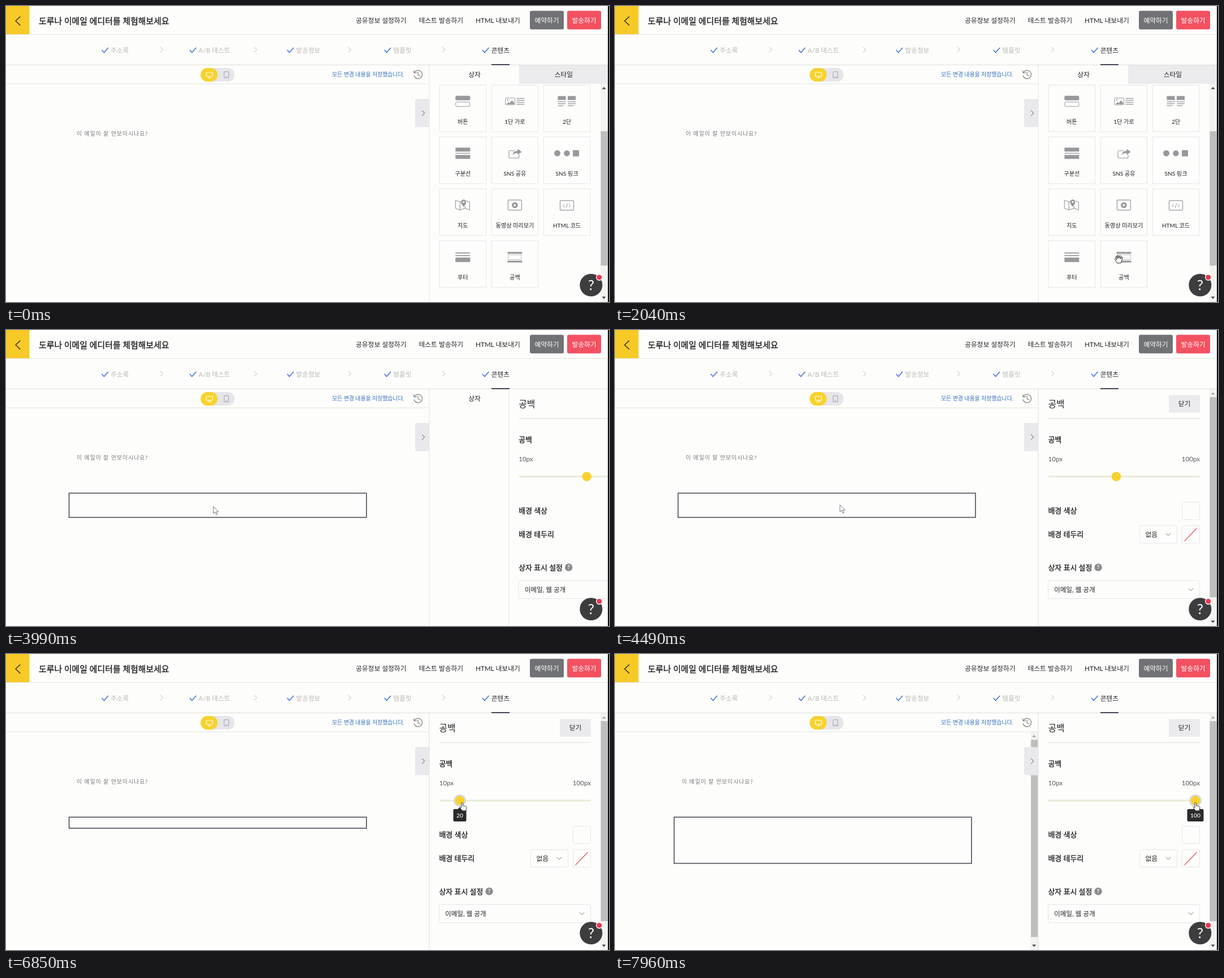
Recreate the animation shown at these times as an HTML page. Size 1067 by 525 pixels, loop 7.99 s.

```html
<!DOCTYPE html>
<html lang="ko">
<head>
<meta charset="utf-8">
<style>
html, body { margin: 0; width: 100%; height: 100%; overflow: hidden; background: #fdfdfb; }
svg { display: block; width: 1067px; height: 525px; }
text { font-family: Lato, "Noto Sans CJK KR", "Noto Sans CJK", sans-serif; white-space: pre; }
.line { fill: none; stroke-linecap: round; stroke-linejoin: round; }
.medium { stroke: #222226; stroke-width: .35; }
</style>
</head>
<body>
<svg id="stage" viewBox="0 0 1067 525"></svg>
<script>
const LOOP = 7990;
const INK = '#222226', GREY = '#98989d', PALE = '#b9b9b6', RULE = '#e4e4dd', EDGE = '#e6e6ed', YELLOW = '#f8d22c';

// Shape helpers; text is placed by its vertical centre
const text = (x, cy, size, str, fill = INK, more = '') =>
  `<text x="${x}" y="${cy + size * .36}" font-size="${size}" fill="${fill}" ${more}>${str}</text>`;
const mid = (x, cy, size, str, fill, more = '') => text(x, cy, size, str, fill, `text-anchor="middle" ${more}`);
const rect = (x, y, w, h, fill, more = '') =>
  `<rect x="${x}" y="${y}" width="${w}" height="${h}" fill="${fill}" ${more}/>`;
const frame = (x, y, w, h, stroke = EDGE, r = 0, width = 1) =>
  rect(x, y, w, h, 'none', `rx="${r}" stroke="${stroke}" stroke-width="${width}"`);
const disc = (x, y, r, fill, more = '') => `<circle cx="${x}" cy="${y}" r="${r}" fill="${fill}" ${more}/>`;
const path = (d, stroke, width = 1) => `<path class="line" d="${d}" stroke="${stroke}" stroke-width="${width}"/>`;
const shape = (d, fill) => `<path d="${d}" fill="${fill}"/>`;
const group = (id, body, more = '') => `<g id="${id}" ${more}>${body}</g>`;
const at = (x, y, body) => `<g transform="translate(${x} ${y})">${body}</g>`;
const rows = (x, w, ys, h = 1.3) => ys.map(y => rect(x, y, w, h, GREY)).join('');
const MEDIUM = 'class="medium"';

function scrollbar(x, top, thumbY, thumbH, upFill, id = '') {
  const c = x + 6;
  return rect(x, top, 13, 525 - top, '#f3f3f2') +
    rect(x + .5, thumbY, 12, thumbH, '#bebebe', id) +
    shape(`M${c - 3.5} ${top + 9.5}h7l-3.5 -4z`, upFill) + shape(`M${c - 3.5} 515.5h7l-3.5 4z`, '#444');
}

function header() {
  const steps = [[169, '주소록'], [324.5, 'A/B 테스트'], [497, '발송정보'], [669, '템플릿'], [842.5, '콘텐츠']];
  return rect(0, 0, 1067, 105, '#fdfdfb') + rect(0, 0, 41.6, 50, '#f7ca27') +
    path('M25 19l-8 7.5 8 7.5', INK, 1.3) +
    text(58, 26.5, 14.9, '도루나 이메일 에디터를 체험해보세요', INK, MEDIUM) +
    text(619, 25.5, 11.75, '공유정보 설정하기') + text(730.5, 25.5, 11.75, '테스트 발송하기') +
    text(831, 25.5, 11.75, 'HTML 내보내기') +
    rect(927, 8.5, 60, 33, '#717276', 'rx="3"') + mid(957, 25.5, 11.75, '예약하기', '#fff') +
    rect(993, 8.5, 60, 33, '#f35162', 'rx="3"') + mid(1023, 25.5, 11.75, '발송하기', '#fff') +
    rect(0, 50, 1066, 1, RULE) + rect(0, 104, 1066, 1, '#deded8') +
    steps.map(([x, s], i) => path(`M${x + 1} 78.5l3.5 4 7 -8`, '#4a78e0', 1.7) +
      text(x + 16.3, 78.5, 11.6, s, i == 4 ? INK : PALE)).join('') +
    [0, 1, 2, 3].map(i => path(`M${273 + i * 166.4} 73l4.5 4.5 -4.5 4.5`, PALE)).join('') +
    rect(859, 103, 32, 2, '#444452');
}

function toolbar() {
  return rect(0, 105, 749, 33, '#fdfdfb') + rect(0, 137.5, 749, 1, RULE) +
    rect(344.5, 110, 60, 24, '#e6e6ea', 'rx="12"') + rect(344.5, 110, 30, 24, YELLOW, 'rx="12"') +
    frame(354.5, 117.5, 11, 7.5, '#fff', 1, 1.2) + path('M360 125v2.5M357.5 127.5h5', '#fff', 1.2) +
    frame(386, 116.5, 8, 11, '#a5a5aa', 1, 1.1) + path('M389 125.5h2', '#a5a5aa') +
    text(577, 121.5, 9.87, '모든 변경 내용을 저장했습니다.', '#3671c4') +
    path('M722.5 118.5a7.3 7.3 0 1 1 -.4 5M721.5 114.5l.8 4.5 4.4 -.6M729 117v5l3.5 2', '#85858a', 1.2);
}

const icons = [
  ['버튼', rect(-13, -10, 26, 8, GREY, 'rx="2"') + frame(-12.5, 1, 25, 8, GREY, 2)],
  ['1단 가로', frame(-16.5, -6, 16.5, 12, GREY, 1) + disc(-12.5, -2.5, 1.3, GREY) +
    shape('M-15 5l4 -4 2 2 4 -5 4 5v2z', GREY) + rows(3, 14, [-6, -2.5, 1, 4.5])],
  ['2단', [-16, 1.5].map(x => rect(x, -9.5, 14, 7, GREY) + rows(x, 14, [0, 3.5]) + rows(x, 10, [7])).join('')],
  ['구분선', rect(-13, -10, 26, 7, GREY) + rows(-13, 26, [-.6]) + rect(-13, 3, 26, 7, GREY)],
  ['SNS 공유', path('M0 -4.5h-9q-1.5 0 -1.5 1.5v10q0 1.5 1.5 1.5h15q1.5 0 1.5 -1.5v-4', GREY, 1.1) +
    shape('M-4 3q1 -7 9 -7.5v-3.5l7 5.5 -7 5.5v-3.5q-6 0 -9 3.5z', GREY)],
  ['SNS 링크', disc(-17, 0, 5.5, GREY) + disc(0, 0, 5.2, GREY) + rect(10.5, -5.5, 11, 11, GREY)],
  ['지도', path('M-5 -6l-8 -2.5v14l8 3 9 -3 8 3v-14l-5 -2M-5 -6l3 -1M-5 -6v14.5M4 2v3.5', GREY, 1.1) +
    shape('M1.5 3q-4.5 -5.5 -4.5 -8.5a4.5 4.5 0 0 1 9 0q0 3 -4.5 8.5z', GREY) +
    disc(1.5, -5.5, 1.6, '#fdfdfb')],
  ['동영상 미리보기', frame(-12, -9, 24, 18, GREY, 1.5, 1.2) + disc(0, 0, 5.3, GREY) +
    shape('M-1.5 -2.8v5.6l4.3 -2.8z', '#fff')],
  ['HTML 코드', frame(-12, -8, 24, 17, GREY, 1.5, 1.2) +
    path('M-4 -1.5l-2.5 2.5 2.5 2.5M4 -1.5l2.5 2.5 -2.5 2.5M1.2 -2.5l-2.4 7', GREY)],
  ['푸터', rows(-13, 26, [-8, -3.5], 1.8) + rect(-13, 1, 26, 8, GREY)],
  ['공백', rect(-13, -9, 26, 3.2, GREY) + rect(-13, 6.5, 26, 3.2, GREY) +
    rect(-11.5, -4, 23, 8.5, 'none', `stroke="${GREY}" stroke-dasharray="2 1.3"`)]
];

function palette() {
  return icons.map(([name, icon], i) => {
    const x = 767 + i % 3 * 92.1, y = 140.3 + Math.floor(i / 3) * 92;
    return frame(x, y, 82.5, 82.7) + at(x + 41.3, y + 28.9, icon) + mid(x + 41.3, y + 65, 10.15, name);
  }).join('') + scrollbar(1052, 138, 222, 238.5, '#444');
}

function settings() {
  const label = (y, s) => text(766.5, y, 12.9, s, INK, MEDIUM);
  const chevron = (x, y) => path(`M${x - 4} ${y - 2}l4 4 4 -4`, '#77777c');
  return rect(749, 105, 320, 420, '#fdfdfb') + rect(748.5, 105, 1, 420, RULE) +
    text(766.5, 131, 15.8, '공백') + rect(980, 115.5, 55, 31, '#ebebee') + mid(1007.5, 131, 11.75, '닫기') +
    rect(767, 156.5, 268, 1, '#dcdcd8') + label(194.5, '공백') +
    text(766.5, 228.5, 11.6, '10px', '#5c5c60') + text(1035, 228.5, 11.6, '100px', '#5c5c60', 'text-anchor="end"') +
    rect(767, 258.5, 268, 3, '#ebe9d8', 'rx="1"') +
    label(320.5, '배경 색상') + frame(1003.5, 305.5, 31, 31, EDGE, 2) +
    label(362, '배경 테두리') + frame(928.5, 347, 66, 31, EDGE, 2) + text(938.5, 362.5, 11.75, '없음') + chevron(979, 362.5) +
    frame(1003.5, 347, 31, 31, EDGE, 2) + path('M1008 374l21 -22', '#e2636b', 1.4) +
    label(421, '상자 표시 설정') + disc(855, 421, 6.7, '#8b8b90') + mid(855, 421, 9.5, '?', '#fff', 'font-weight="700"') +
    frame(766.5, 444.5, 268, 32, EDGE, 2) + text(777, 460.5, 11.6, '이메일, 웹 공개') + chevron(1019, 460.5) +
    scrollbar(1052, 105, 119, 355, '#a5a5a5') +
    group('knob', disc(0, 260, 11, '#d5dbe4', 'id="halo"') + disc(0, 260, 8.3, YELLOW)) +
    group('tip', shape('M-4 275.5l4 -4 4 4z', '#2b2b2d') + rect(-11.5, 275, 23, 22, '#2b2b2d', 'rx="2.5" id="tipBox"') +
      mid(0, 286, 10.3, '50', '#fff', 'id="tipText" font-weight="500"'));
}

function cursors() {
  const outlined = (id, d, stroke = '#222') =>
    group(id, `<path d="${d}" fill="#fff" stroke="${stroke}" stroke-linejoin="round"/>`);
  return outlined('grab', 'M-2.5 7C-4 3.5 -6 2 -6.5 .5q0 -1.7 1.8 -1l1.7 1.7 -2 -5q0 -1.7 1.7 -1.2l1.8 4 -.6 -5q.8 -1.6 2 0l.9 4.7 1 -4.4q1.3 -1.1 2 .3l-.3 5 1.5 -3.3q1.5 -.8 1.7 .7c-.5 4 -1 7 -2.7 10z') +
    outlined('arrow', 'M0 0v12.5l3 -2.7 2.2 5 2 -.9 -2.2 -4.7h4z', '#77777f') +
    outlined('hand', 'M-1 0q1.5 -1.3 2.5 0v5l5 1.2q1.8 .5 1.5 2.3l-1.3 5.5h-6.2l-3.5 -4.5q-1.2 -2 .3 -2.5l1.7 1.2z', '#444');
}

document.getElementById('stage').innerHTML =
  '<defs><clipPath id="side"><rect x="748" y="105" width="318" height="420"/></clipPath></defs>' +
  rect(0, 0, 1067, 525, '#fdfdfb') +
  group('mail', text(125, 226.5, 9.8, '이 메일이 잘 안보이시나요?', '#77777a', 'letter-spacing="1.05"') +
    rect(111.6, 289.4, 526.2, 43, 'none', 'id="spacer" stroke="#4b4b59" stroke-width="1.6"')) +
  group('mailBar', scrollbar(735.5, 138, 152, 350, '#a5a5a5', 'id="mailThumb"')) +
  toolbar() + rect(724, 165, 25, 50, '#e9e9ed', 'rx="2"') + path('M736.5 185.5l4 4.5 -4 4.5', '#55555a') +
  rect(748.5, 105, 1, 420, RULE) + rect(908, 105, 158, 33, '#ebebee', 'id="styleTab"') +
  mid(987, 122, 11.7, '스타일', INK, 'id="styleText"') +
  mid(829, 122, 11.75, '상자') + group('tiles', palette()) +
  `<g clip-path="url(#side)">${group('panel', settings())}</g>` +
  header() + rect(1065, 0, 2, 525, '#0c0c0c') +
  disc(1035.3, 495, 20, '#3d3d3f') + mid(1035.3, 495, 25, '?', '#fff') +
  disc(1049.8, 481.3, 5.2, '#e8384f', 'stroke="#fff" stroke-width="1.3"') +
  group('cursor', cursors());

const el = {};
document.querySelectorAll('[id]').forEach(n => el[n.id] = n);
const show = (n, on) => n.style.display = on ? '' : 'none';
const move = (n, x, y = 0) => n.setAttribute('transform', `translate(${x} ${y})`);
const clamp = (v, lo, hi) => Math.min(hi, Math.max(lo, v));
const ease = p => { p = clamp(p, 0, 1); return p * p * (3 - 2 * p); };

const START = 1400, DROP = 3700, SLIDE = 3830, HOVER = 5200, PRESS = 5600;
// time, x, y of the pointer's hot spot
const route = [
  [START, 905, 540], [1900, 891, 449], [2150, 891, 449], [2870, 357, 289], [3000, 357, 289],
  [3500, 367, 313], [4350, 367, 313], [5300, 888, 264], [PRESS, 888, 264],
  [6700, 807, 264], [6950, 807, 264], [7800, 1027, 264]
];

function pointer(t) {
  const i = route.findIndex(k => k[0] > t);
  if (i < 0) return route.at(-1).slice(1);
  if (i == 0) return route[0].slice(1);
  const [t0, x0, y0] = route[i - 1], [t1, x1, y1] = route[i];
  const p = ease((t - t0) / (t1 - t0));
  return [x0 + (x1 - x0) * p, y0 + (y1 - y0) * p];
}

function draw(t) {
  const [x, y] = pointer(t), dropped = t >= DROP;
  show(el.cursor, t >= START);
  move(el.cursor, x, y);
  show(el.grab, !dropped);
  show(el.arrow, dropped && t < HOVER);
  show(el.hand, t >= HOVER);

  show(el.tiles, !dropped);
  show(el.panel, t >= SLIDE);
  move(el.panel, 316 * (1 - ease((t - SLIDE) / 300)));

  const value = t < PRESS ? 50 : clamp(Math.round((50 + (x - 888) / 2.8) / 5) * 5, 10, 100);
  const knobX = 775 + (value - 10) * 2.8;
  move(el.knob, knobX);
  move(el.tip, knobX);
  show(el.halo, t >= PRESS);
  show(el.tip, t >= HOVER);
  el.tipText.textContent = value;
  const tipW = value == 100 ? 29 : 23;
  el.tipBox.setAttribute('x', -tipW / 2);
  el.tipBox.setAttribute('width', tipW);

  show(el.spacer, dropped);
  el.spacer.setAttribute('height', value * .78 + 4);
  const overflow = dropped ? Math.max(0, (value - 90) * .78) : 0;
  show(el.mailBar, overflow > 0);
  el.mailThumb.setAttribute('height', 357 * 387 / (387 + overflow));
  move(el.mail, overflow > 0 ? -7 : 0);
}

const begin = performance.now();
function tick() {
  draw((performance.now() - begin) % LOOP);
  requestAnimationFrame(tick);
}
tick();
</script>
</body>
</html>
```
